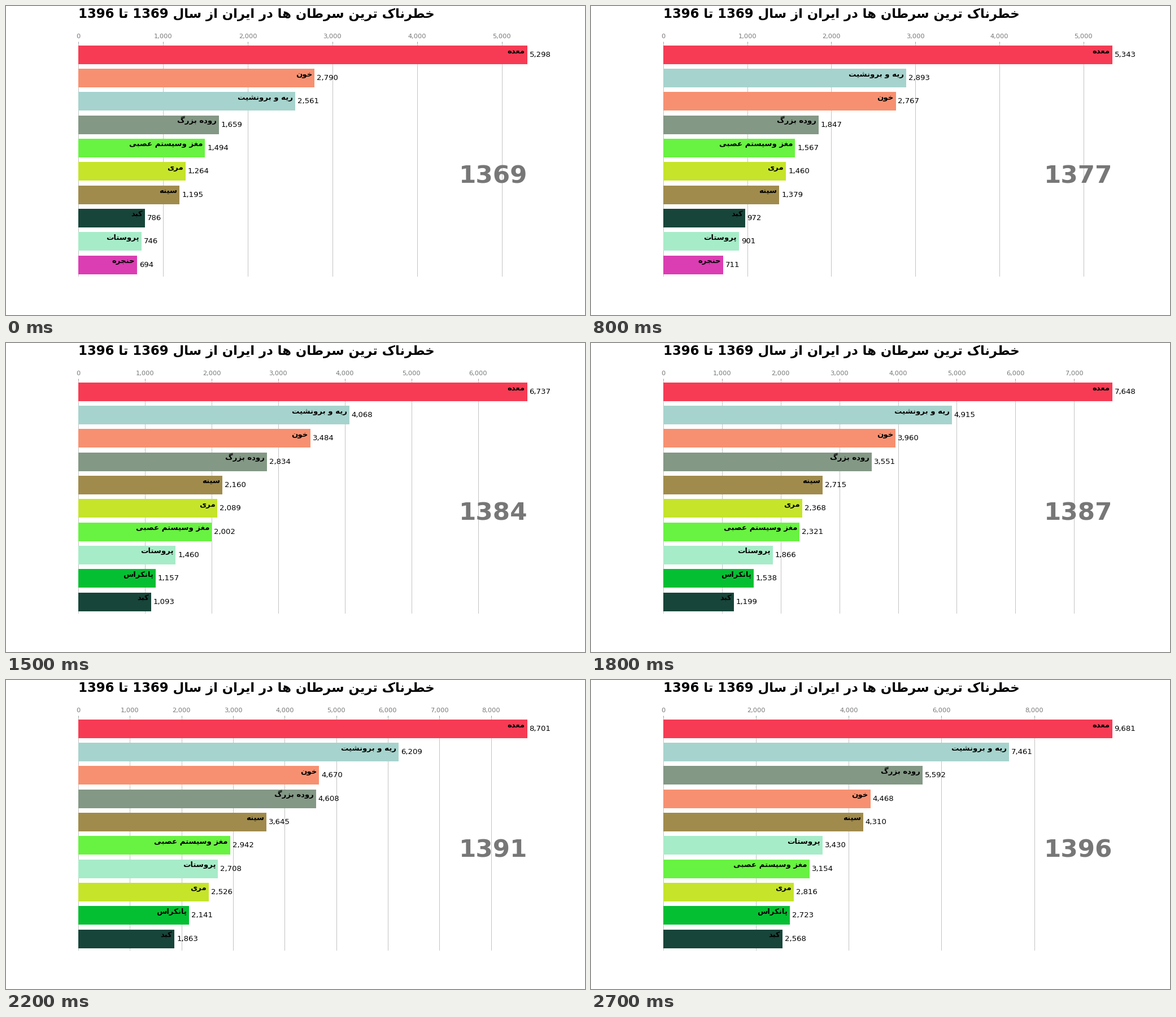
These frames come from a looping animation (1025x547 px, 2800 ms). A matplotlib script:

```python
import matplotlib.pyplot as plt
import numpy as np
from matplotlib.animation import FuncAnimation

WIDTH, HEIGHT, DPI = 1025, 547, 1025 / 15
FIRST_YEAR, YEARS = 1369, 28
GREY = "#777777"
TITLE = "خطرناک ترین سرطان ها در ایران از سال 1369 تا 1396"

# Isolated presentation form; final, initial and medial follow it.
DUAL = dict(zip("بپتجحخسشصطعغکگلمنهی", (
    0xFE8F, 0xFB56, 0xFE95, 0xFE9D, 0xFEA1, 0xFEA5, 0xFEB1, 0xFEB5, 0xFEB9, 0xFEC1,
    0xFEC9, 0xFECD, 0xFB8E, 0xFB92, 0xFEDD, 0xFEE1, 0xFEE5, 0xFEE9, 0xFBFC)))
RIGHT_ONLY = dict(zip("ادرزو", (0xFE8D, 0xFEA9, 0xFEAD, 0xFEAF, 0xFEED)))
LETTERS = {**DUAL, **RIGHT_ONLY}

KEY_YEARS = np.array([0, 4, 8, 12, 18, 22, 24, 27])
SERIES = [
    ("معده", "#f73b54", (5298, 5258, 5343, 5930, 7648, 8701, 9100, 9681)),
    ("خون", "#f79070", (2790, 2737, 2767, 3094, 3960, 4670, 4640, 4468)),
    ("ریه و برونشیت", "#a6d3cd", (2561, 2742, 2893, 3398, 4915, 6209, 6730, 7461)),
    ("روده بزرگ", "#839885", (1659, 1751, 1847, 2262, 3551, 4608, 5010, 5592)),
    ("مغز وسیستم عصبی", "#68f241", (1494, 1546, 1567, 1776, 2321, 2942, 2995, 3154)),
    ("مری", "#c5e42a", (1264, 1330, 1460, 1774, 2368, 2526, 2650, 2816)),
    ("سینه", "#a08b4c", (1195, 1326, 1379, 1734, 2715, 3645, 3930, 4310)),
    ("کبد", "#17453a", (786, 862, 972, 1107, 1199, 1863, 2170, 2568)),
    ("پروستات", "#a6ecc8", (746, 787, 901, 1181, 1866, 2708, 3020, 3430)),
    ("حنجره", "#db3db3", (694, 697, 711, 740, 790, 830, 850, 880)),
    ("پانکراس", "#05bf32", (430, 500, 610, 856, 1538, 2141, 2370, 2723)),
]


def shape_word(word):
    """Join the letters of one word and put them in visual order."""
    if word.isdigit():
        return word
    glyphs = []
    for i, letter in enumerate(word):
        joins_before = i > 0 and word[i - 1] in DUAL
        joins_after = letter in DUAL and i + 1 < len(word)
        glyphs.append(chr(LETTERS[letter] + joins_before + 2 * joins_after))
    return "".join(reversed(glyphs))


def shape(text):
    return " ".join(shape_word(word) for word in reversed(text.split()))


def smooth_curve(values):
    """Cubic Hermite curve through the key years, one value per year."""
    values = np.array(values, float)
    slopes = np.gradient(values, KEY_YEARS)
    years = np.arange(YEARS)
    k = np.clip(np.searchsorted(KEY_YEARS, years, "right") - 1, 0, len(KEY_YEARS) - 2)
    span = KEY_YEARS[k + 1] - KEY_YEARS[k]
    t = (years - KEY_YEARS[k]) / span
    ease = t * t * (3 - 2 * t)
    return (values[k] * (1 - ease) + values[k + 1] * ease
            + span * t * (1 - t) * (slopes[k] * (1 - t) - slopes[k + 1] * t))


NAMES = [shape(name) for name, _, _ in SERIES]
COLORS = [color for _, color, _ in SERIES]
VALUES = np.array([smooth_curve(values) for _, _, values in SERIES])
SHAPED_TITLE = shape(TITLE)

plt.rcParams["font.family"] = "DejaVu Sans"
# The small surplus keeps the pixel size from being rounded down.
fig, ax = plt.subplots(figsize=((WIDTH + 0.01) / DPI, (HEIGHT + 0.01) / DPI), dpi=DPI)
fig.subplots_adjust(left=0.125, right=0.9, bottom=0.125, top=0.88)


def draw(frame):
    ax.clear()
    totals = VALUES[:, frame]
    top_ten = np.argsort(totals)[-10:]
    ax.barh(range(10), totals[top_ten], color=[COLORS[i] for i in top_ten])

    gap = totals.max() / 200
    for row, i in enumerate(top_ten):
        ax.text(totals[i] - gap, row, NAMES[i], size=14, weight=600, ha="right", va="bottom")
        ax.text(totals[i] + gap, row, f"{totals[i]:,.0f}", size=14, ha="left", va="center")

    ax.text(1, 0.4, str(FIRST_YEAR + frame), transform=ax.transAxes,
            color=GREY, size=46, weight=800, ha="right")
    ax.text(0, 1.15, SHAPED_TITLE, transform=ax.transAxes,
            size=24, weight=600, ha="left", va="top")

    ax.xaxis.set_major_formatter("{x:,.0f}")
    ax.xaxis.set_ticks_position("top")
    ax.tick_params(axis="x", colors=GREY, labelsize=12)
    ax.set_yticks([])
    ax.margins(0, 0.01)
    ax.grid(axis="x", linestyle="-")
    ax.set_axisbelow(True)
    ax.set_frame_on(False)


animation = FuncAnimation(fig, draw, frames=YEARS, interval=100, repeat=True, repeat_delay=0)
plt.show()
```
